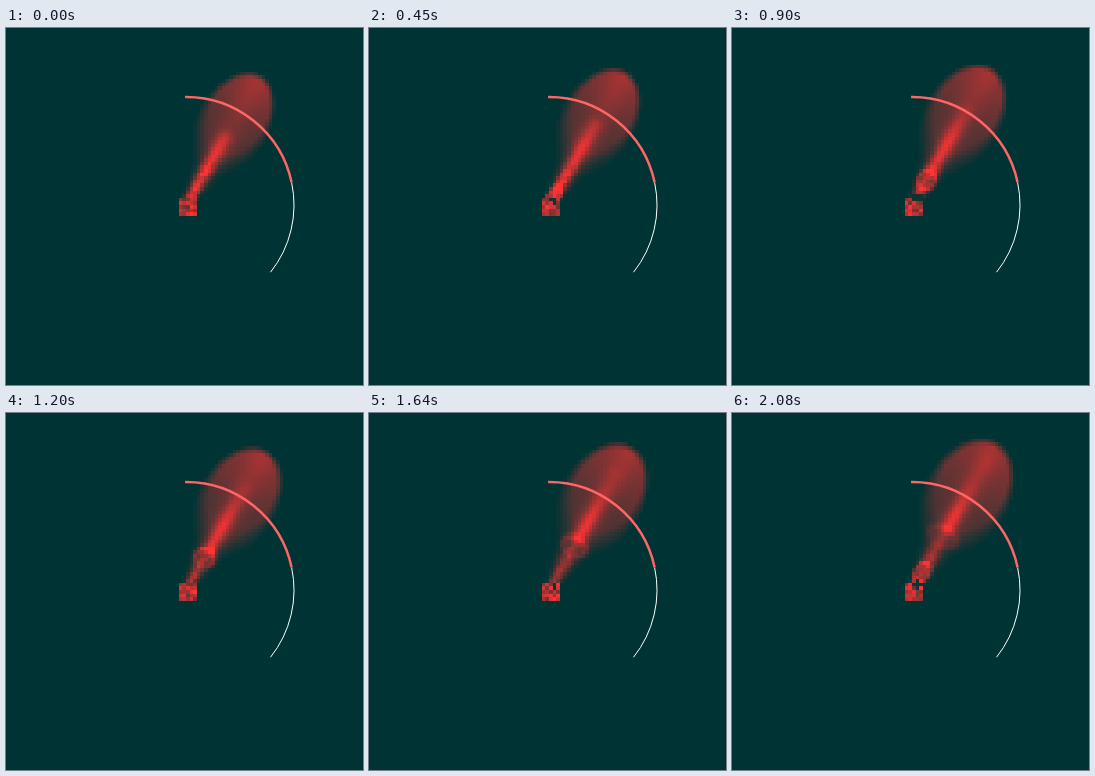
An HTML page with a canvas for the animation above (2230 ms loop, 357x357 px).

```html
<!DOCTYPE html>
<html lang="en">
<head>
<meta charset="utf-8">
<title>Drifting plume</title>
<style>
  html, body { margin: 0; width: 100%; height: 100%; overflow: hidden; background: #033; }
  canvas { display: block; width: 357px; height: 357px; }
</style>
</head>
<body>
<canvas id="stage" width="357" height="357"></canvas>
<script>
const ctx = document.getElementById('stage').getContext('2d');
const LOOP = 2230, TICK = 148.5, LAST = 9, PERIOD = 6;
const CELL = 3.6, CX = 180, CY = 177, R = 108;

const clamp = v => Math.max(0, Math.min(1, v));
const bell = (x, w) => Math.exp(-x * x / (2 * w * w));
const screen = (a, b) => 1 - (1 - a) * (1 - b);
const noise = (i, j, k) => {
  const n = Math.sin(i * 12.99 + j * 78.23 + k * 37.7) * 43758.55;
  return n - Math.floor(n);
};

// The wide cloud: crisp at its head, soft towards the vent
function cloud(s, p, k) {
  const mid = 94 + 1.5 * k, len = 57 + 0.8 * k, wide = 37 + 0.75 * k;
  const u = (s - mid) / len;
  const q = Math.hypot(u, p / wide);
  if (q >= 1) return 0;
  const head = clamp(u * 0.5 + 0.5);
  const edge = clamp((1 - q) * (2 + 7 * head * head));
  return edge * (0.14 + 0.42 * head + 0.12 * bell(p, 10));
}

// A puff leaving the vent: a bright front that widens, and a thinner stream behind it
function puff(s, p, age) {
  if (age < 1) return { ring: 0, wake: 0 };
  const mid = 2 + 9.8 * age - 0.3 * age * age;
  const r = Math.hypot((s - mid) / 10, p / (4.5 + 1.2 * age));
  const back = age > 3 ? clamp((s - mid + 12) / 10) : 1;
  const fade = clamp(1.15 - age * 0.1);
  return {
    ring: 0.5 * fade * back * bell(r - 1, 0.2),
    wake: 0.6 * clamp((mid + 8 - s) / 6) * clamp((age - 1) / 3)
  };
}

// Thin bright stream inside a softer cone
function stream(s, p, k, grain) {
  const front = 83 + 8 * k, bright = 62 + 3 * k;
  const one = puff(s, p, k - 1), two = puff(s, p, k - 1 - PERIOD);
  const amp = 0.85 - clamp((s - bright) / 40) * 0.65;
  const core = amp * clamp((front - s) / 9 + 0.5) * bell(p, 3 + s * 0.022) * (1 - Math.max(one.wake, two.wake));
  const cone = 0.45 * bell(p, 2 + 0.12 * s) * clamp(1.5 - s / 65);
  return clamp(screen(core, cone) * grain + one.ring + two.ring);
}

function density(i, j, k) {
  const x = (i + 0.5) * CELL, y = (j + 0.5) * CELL;
  const s = 0.5 * x - 0.866 * y, p = 0.866 * x + 0.5 * y;
  const age = (k + PERIOD - 1) % PERIOD;

  // A new puff opens a small hole beside the vent, which drifts up with it
  const hole = age < 4 && Math.hypot(x - 5, y + 2.5 + 1.5 * age) < 3.2 + age * 0.5;
  if (hole) return 0.06;

  if (Math.max(Math.abs(i), Math.abs(j)) <= 2) {
    return 0.4 + 0.6 * noise(i, j, i < -1 ? 0 : k);
  }
  const a = cloud(s, p, k);
  if (s < 5) return a;
  const grain = s < 50 ? 0.85 + 0.3 * noise(i, j, k) : 1;
  return clamp(screen(a, stream(s, p, k, grain)));
}

function arc(from, to, color, width) {
  ctx.beginPath();
  ctx.arc(CX, CY, R, from * Math.PI / 180, to * Math.PI / 180);
  ctx.strokeStyle = color;
  ctx.lineWidth = width;
  ctx.stroke();
}

function draw(k) {
  ctx.fillStyle = '#033';
  ctx.fillRect(0, 0, 357, 357);
  for (let j = -42; j <= 2; j++) {
    for (let i = -2; i < 29; i++) {
      const a = density(i, j, k);
      if (a < 0.02) continue;
      const x = Math.round(CX + i * CELL), y = Math.round(CY + j * CELL);
      ctx.fillStyle = `rgb(${Math.round(255 * a)},51,51)`;
      ctx.fillRect(x, y, Math.round(CX + (i + 1) * CELL) - x, Math.round(CY + (j + 1) * CELL) - y);
    }
  }
  arc(-12, 38.5, '#fff', 1);
  arc(-90.5, -12, '#f66', 2.5);
}

const start = performance.now();
let shown = -1;
function tick() {
  const t = Math.max(0, performance.now() - start) % LOOP;
  // Two steps for every three ticks
  const k = Math.min(LAST, Math.floor(Math.floor(t / TICK) * 2 / 3));
  if (k !== shown) draw(shown = k);
  requestAnimationFrame(tick);
}
tick();
</script>
</body>
</html>
```
